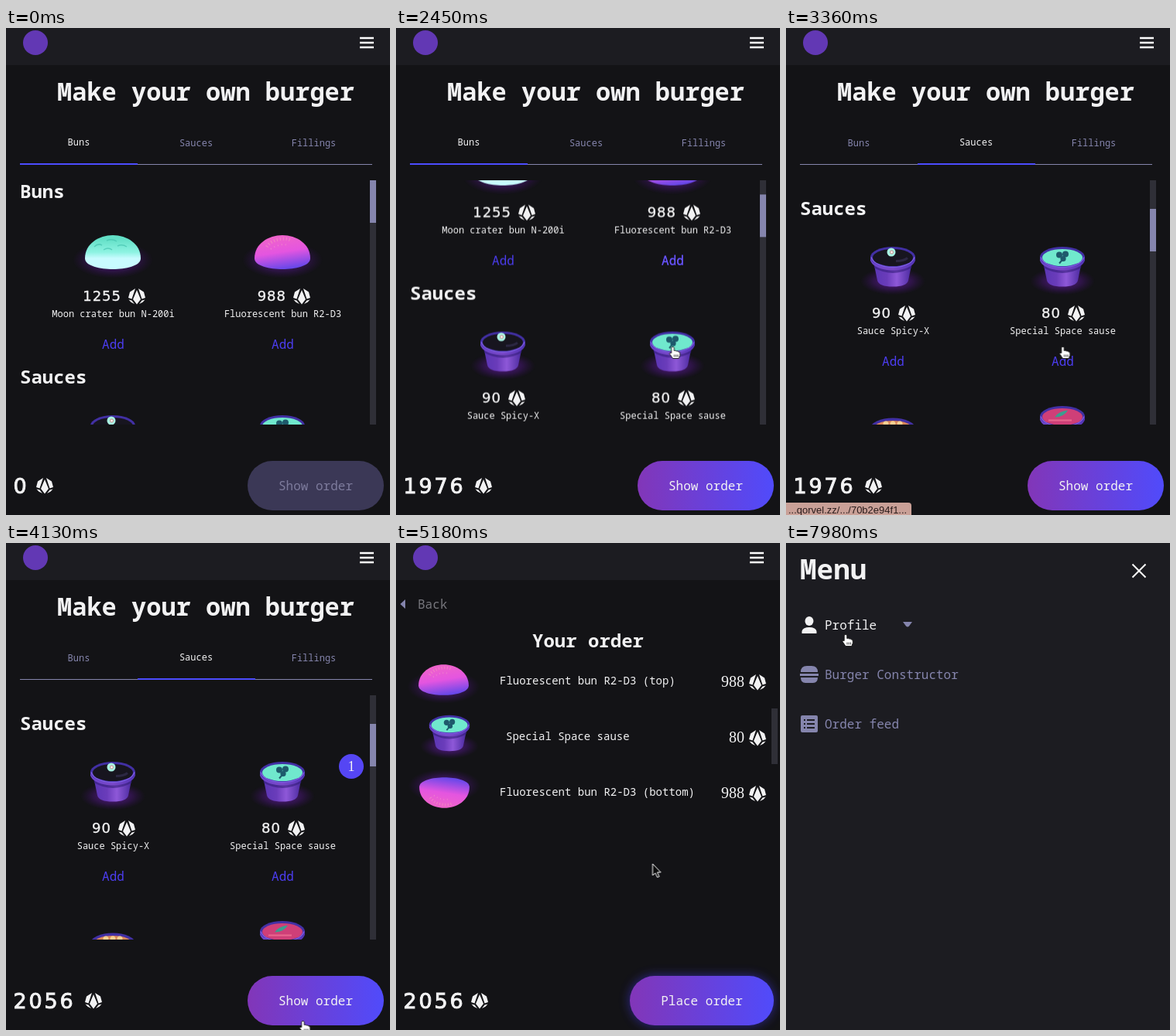
Recreate the animation shown at these times as an HTML page. Size 496 by 630 pixels, loop 8000 ms.

```html
<!DOCTYPE html>
<html lang="en">
<head>
<meta charset="utf-8">
<title>Burger builder</title>
<style>
html, body { margin: 0; width: 100%; height: 100%; overflow: hidden; background: #131316; }
svg { display: block; }
text { font: 12px "Noto Sans Mono", "DejaVu Sans Mono", monospace; fill: #f2f2f3; white-space: pre; }
.h1 { font-size: 32px; font-weight: 600; }
.h2 { font-size: 24px; font-weight: 600; }
.menu-title { font-size: 36px; font-weight: 600; }
.m { font-size: 16px; }
.row { font-size: 14px; }
.mid { text-anchor: middle; }
.dim { fill: #8585ad; }
.add { font-size: 16px; fill: #4c3df0; text-anchor: middle; }
.price { font: 18px "DejaVu Sans", sans-serif; letter-spacing: 1px; text-anchor: end; stroke: #f2f2f3; stroke-width: .35px; }
.total { font: 27px "DejaVu Sans", sans-serif; letter-spacing: 2.8px; stroke: #f2f2f3; stroke-width: 1px; }
.cost { font: 20px "Liberation Serif", serif; text-anchor: end; }
.badge { font: 18px "Liberation Serif", serif; text-anchor: middle; }
.link { font: 13px "Liberation Sans", sans-serif; fill: #2a1c1c; }

/* Hard switches; --k names the window */
.s { animation: var(--k) 8s step-end infinite; }
@keyframes empty   { 0% { opacity: 1 } 24.5%, 100% { opacity: 0 } }
@keyframes filled  { 0% { opacity: 0 } 24.5%, 100% { opacity: 1 } }
@keyframes bunOnly { 0% { opacity: 0 } 24.5% { opacity: 1 } 43.75%, 100% { opacity: 0 } }
@keyframes sauced  { 0% { opacity: 0 } 43.75%, 100% { opacity: 1 } }
@keyframes tabOne  { 0% { opacity: 1 } 31%, 100% { opacity: 0 } }
@keyframes tabTwo  { 0% { opacity: 0 } 31%, 100% { opacity: 1 } }
@keyframes hint    { 0% { opacity: 0 } 32.5% { opacity: 1 } 43.2%, 100% { opacity: 0 } }
@keyframes ordered { 0% { opacity: 0 } 56.625%, 100% { opacity: 1 } }
@keyframes hand {
  0% { opacity: 0 } 16.25% { opacity: 1 } 46.5% { opacity: 0 } 51% { opacity: 1 }
  61% { opacity: 0 } 78.75% { opacity: 1 } 96.25% { opacity: 0 } 98.75%, 100% { opacity: 1 }
}
@keyframes arrow {
  0% { opacity: 0 } 2.625% { opacity: 1 } 16.25% { opacity: 0 } 46.5% { opacity: 1 } 51% { opacity: 0 }
  61% { opacity: 1 } 78.75% { opacity: 0 } 96.25% { opacity: 1 } 98.75%, 100% { opacity: 0 }
}

#list { animation: scroll 8s linear infinite; }
@keyframes scroll {
  0%, 28% { transform: translateY(0) }
  30% { transform: translateY(-85px) }
  31.5% { transform: translateY(-140px) }
  33.25% { transform: translateY(-170px) }
  35% { transform: translateY(-177px) }
  37.5% { transform: translateY(-190px) }
  42%, 100% { transform: translateY(-218px) }
}
#thumb { animation: thumb 8s linear infinite; }
@keyframes thumb {
  0%, 28% { transform: translateY(0) }
  30% { transform: translateY(14.4px) }
  31.5% { transform: translateY(23.8px) }
  33.25% { transform: translateY(28.9px) }
  35% { transform: translateY(30px) }
  37.5% { transform: translateY(32.3px) }
  42%, 100% { transform: translateY(37px) }
}
.glow { animation: glow 8s linear infinite; }
@keyframes glow {
  0%, 51.875% { opacity: 0 }
  55.6%, 61.5% { opacity: .85 }
  64.75% { opacity: .6 }
  68.5%, 100% { opacity: 0 }
}
#menu { animation: slide 8s ease-out infinite; }
@keyframes slide {
  0%, 87.25% { transform: translateX(500px) }
  91%, 100% { transform: translateX(0) }
}
#profile { fill: #8585ad; animation: profile 8s linear infinite; }
#profile text { fill: inherit; }
@keyframes profile { 0%, 98.6% { fill: #8585ad } 99.6%, 100% { fill: #f2f2f3 } }
#cursor { animation: move 8s ease-in-out infinite; }
@keyframes move {
  0%, 2.625% { transform: translate(403px, 600px) }
  17.5%, 45.5% { transform: translate(357.5px, 412px) }
  51.625% { transform: translate(383.5px, 618px) }
  54%, 59.5% { transform: translate(382px, 606px) }
  64.3%, 67.5% { transform: translate(331.5px, 415px) }
  74.4% { transform: translate(452px, 32px) }
  80.5%, 95.5% { transform: translate(464px, 17px) }
  99.6%, 100% { transform: translate(77px, 118px) }
}
</style>
</head>
<body>
<svg width="496" height="630" viewBox="0 0 496 630">
<defs>
  <linearGradient id="moon" x2="0" y2="1">
    <stop offset=".1" stop-color="#62dfc6"/><stop offset=".5" stop-color="#8df3e2"/><stop offset=".68" stop-color="#c8fbff"/>
  </linearGradient>
  <linearGradient id="fluo" x1=".35" x2=".6" y2="1">
    <stop offset=".1" stop-color="#ee62cc"/><stop offset=".5" stop-color="#e455e0"/><stop offset="1" stop-color="#6247ea"/>
  </linearGradient>
  <linearGradient id="pot">
    <stop stop-color="#5a35b4"/><stop offset=".35" stop-color="#6a3cba"/><stop offset=".6" stop-color="#8e58d8"/><stop offset="1" stop-color="#47289c"/>
  </linearGradient>
  <linearGradient id="lip">
    <stop stop-color="#6b45cc"/><stop offset=".5" stop-color="#7a48c8"/><stop offset="1" stop-color="#5434b8"/>
  </linearGradient>
  <linearGradient id="cta"><stop stop-color="#8236b8"/><stop offset="1" stop-color="#504bfb"/></linearGradient>
  <radialGradient id="haze">
    <stop stop-color="#7a1fc0" stop-opacity=".8"/><stop offset=".6" stop-color="#55178c" stop-opacity=".4"/>
    <stop offset="1" stop-color="#40106a" stop-opacity="0"/>
  </radialGradient>
  <filter id="blur" x="-30%" y="-60%" width="160%" height="220%"><feGaussianBlur stdDeviation="7"/></filter>
  <clipPath id="view"><path d="M0 197H470V513H0Z"/></clipPath>

  <path id="facets" d="M-2 -10L-9 -5.500L-11 2L-6.500 3.500ZM-10.500 4.500L-6.500 5.500L-3 10L-7.500 7.800Z"/>
  <g id="gem" fill="#f2f2f3">
    <path d="M0 -8L5 4L0 10.500L-5 4Z"/>
    <use href="#facets"/><use href="#facets" transform="scale(-1 1)"/>
  </g>

  <path id="shell" d="M-36 8C-36 -11 -18 -22 0 -22S36 -11 36 8C36 18 16 22 0 22S-36 18 -36 8Z"/>
  <g id="moonBun">
    <ellipse cy="10" rx="52" ry="24" fill="url(#haze)"/>
    <use href="#shell" fill="url(#moon)"/>
    <path d="M-24 -7q5 -5 10 -2M-8 -15q7 -3 13 1M6 -8q6 -3 12 1M-12 -3q6 -4 11 0" fill="none" stroke="#46c4b0" stroke-width="1.5" opacity=".7"/>
  </g>
  <g id="fluoBun">
    <ellipse cy="10" rx="52" ry="24" fill="url(#haze)"/>
    <use href="#shell" fill="url(#fluo)"/>
    <path d="M-20 -7C-14 -17 4 -20 12 -15" fill="none" stroke="#f5a0bd" stroke-width="4" stroke-dasharray="1 3" opacity=".6"/>
    <path d="M-15 -4Q-4 -12 8 -9" fill="none" stroke="#f59ac8" stroke-width="2" stroke-dasharray="1 4" opacity=".6"/>
  </g>

  <g id="cup">
    <ellipse cy="31" rx="42" ry="18" fill="url(#haze)"/>
    <path d="M-25 6L-20 30Q-18 38 0 38T20 30L25 6Z" fill="url(#pot)"/>
    <path d="M-25 9Q0 24 25 9L24 14Q0 27 -24 14Z" fill="#351d7c" opacity=".6"/>
    <path d="M-29 -1V4C-27 12 -14 17 0 17S27 12 29 4V-1Z" fill="url(#lip)"/>
    <ellipse rx="29" ry="13.500" fill="#4230a4"/>
    <path d="M-28 0C-25 9 -12 13 0 13S25 9 28 0" fill="none" stroke="#7d5ae0" stroke-width="1.500"/>
  </g>
  <g id="spicy">
    <use href="#cup"/><ellipse cy=".5" rx="26" ry="11" fill="#17151f"/>
    <path d="M4 5Q14 5 19 1" fill="none" stroke="#2c2742" stroke-width="3"/>
    <circle cx="-2" cy="-6.500" r="5.500" fill="#a9f2e2"/><circle cx="-1.500" cy="-6.500" r="2" fill="#f7faf5" stroke="#c98787"/>
  </g>
  <g id="space">
    <use href="#cup"/><ellipse cy=".5" rx="26" ry="11" fill="#70e8cd"/>
    <g fill="#1e5a6c"><circle cx="-4" cy="-3" r="4"/><circle cx="4" cy="-4" r="4"/><circle cx="1" cy="2" r="3.600"/></g>
    <path d="M1 2L-4 8" stroke="#1e5a6c" stroke-width="2"/>
  </g>
  <g id="fruit">
    <use href="#cup"/><ellipse cy="1" rx="26" ry="11" fill="#d98558"/>
    <path d="M-17 -1H18M-9 -6H12" stroke="#f5cf92" stroke-width="7" stroke-linecap="round" stroke-dasharray="0 9"/>
  </g>
  <g id="galaxy">
    <use href="#cup"/><ellipse cy=".5" rx="26" ry="11" fill="#cf3f78"/>
    <path d="M-10 1Q-6 -6 7 -8Q2 1 -10 1Z" fill="#3b9d8f"/><path d="M-18 5H12" stroke="#e8688f" stroke-width="2"/>
  </g>
</defs>

<rect width="496" height="630" fill="#131316"/>
<rect width="496" height="48" fill="#1c1c21"/>
<circle cx="38" cy="19" r="16" fill="#6238b4"/>
<path d="M457 14H475M457 19H475M457 24H475" stroke="#fff" stroke-width="2" transform="translate(0 -3.800) scale(1 1.200)"/>

<!-- Builder -->
<text class="h1" x="66" y="94">Make your own burger</text>
<path d="M18 176.500H473" stroke="#8585ad"/>
<g class="s mid" style="--k:tabOne">
  <text x="94" y="152">Buns</text><text class="dim" x="245.500" y="153">Sauces</text>
  <path d="M18 176H170" stroke="#4c4cff" stroke-width="2"/>
</g>
<g class="s mid" style="--k:tabTwo">
  <text class="dim" x="94" y="153">Buns</text><text x="245.500" y="152">Sauces</text>
  <path d="M170 176H322" stroke="#4c4cff" stroke-width="2"/>
</g>
<text class="dim mid" x="397.500" y="153">Fillings</text>

<g clip-path="url(#view)"><g id="list">
  <text class="h2" x="18" y="220">Buns</text>
  <use href="#moonBun" x="138" y="290"/>
  <text class="price" x="149" y="353">1255</text><use href="#gem" x="169" y="347"/>
  <text class="mid" x="138.500" y="374">Moon crater bun N-200i</text>
  <text class="add" x="138.500" y="415">Add</text>
  <use href="#fluoBun" x="357" y="290"/>
  <text class="price" x="362" y="353">988</text><use href="#gem" x="382" y="347"/>
  <text class="mid" x="357.500" y="374">Fluorescent bun R2-D3</text>
  <text class="add" x="357.500" y="415">Add</text>
  <g class="s" style="--k:filled">
    <text class="add" x="357.500" y="415" style="fill:#6d58fa">Add</text>
    <circle cx="446" cy="267" r="16" fill="#5546f4"/><text class="badge" x="446" y="273">2</text>
  </g>

  <text class="h2" x="18" y="460">Sauces</text>
  <use href="#spicy" x="138" y="514.500"/>
  <text class="price" x="136" y="593">90</text><use href="#gem" x="156" y="587"/>
  <text class="mid" x="138.500" y="614">Sauce Spicy-X</text>
  <text class="add" x="138.500" y="655">Add</text>
  <use href="#space" x="357" y="514.500"/>
  <text class="price" x="355" y="593">80</text><use href="#gem" x="375" y="587"/>
  <text class="mid" x="357.500" y="614">Special Space sause</text>
  <text class="add" x="357.500" y="655">Add</text>
  <g class="s" style="--k:sauced">
    <circle cx="446" cy="507" r="16" fill="#5546f4"/><text class="badge" x="446" y="513">1</text>
  </g>
  <use href="#fruit" x="138" y="736"/>
  <use href="#galaxy" x="357" y="720.500"/>
</g></g>
<path d="M470 197H478V513H470Z" fill="#2f2f37"/>
<path id="thumb" d="M470 197H478V252H470Z" fill="#8585ad"/>

<g class="s" style="--k:empty">
  <text class="total" x="9.500" y="602">0</text><use href="#gem" x="50" y="592"/>
  <rect x="312" y="560" width="176" height="64" rx="32" fill="#3b3856"/>
  <text class="m mid" x="400" y="598" style="fill:#7d7b9c">Show order</text>
</g>
<g class="s" style="--k:filled">
  <rect class="glow" x="312" y="560" width="176" height="64" rx="32" fill="#3f35e0" filter="url(#blur)"/>
  <rect x="312" y="560" width="176" height="64" rx="32" fill="url(#cta)"/>
  <text class="m mid" x="400" y="598">Show order</text>
  <use href="#gem" x="113" y="592"/>
</g>
<text class="total s" x="9.500" y="602" style="--k:bunOnly">1976</text>
<text class="total s" x="9.500" y="602" style="--k:sauced">2056</text>
<g class="s" style="--k:hint">
  <path d="M0 614H158Q162 614 162 618V630H0Z" fill="#c9a097"/>
  <text class="link" x="3" y="628">...qorvel.zz/.../70b2e94f1...</text>
</g>

<!-- Order -->
<g class="s" style="--k:ordered">
  <rect y="48" width="496" height="582" fill="#131316"/>
  <path d="M12 73V85L5.500 79Z" fill="#8585ad"/>
  <text class="m" x="28" y="85" style="fill:#77777d">Back</text>
  <text class="h2 mid" x="248" y="135">Your order</text>
  <use href="#fluoBun" transform="translate(61.500 177) scale(.9)"/>
  <text class="row" x="134" y="183">Fluorescent bun R2-D3 (top)</text>
  <text class="cost" x="450" y="186">988</text><use href="#gem" x="467" y="180"/>
  <use href="#space" transform="translate(69 235) scale(.9)"/>
  <text class="row" x="142" y="255">Special Space sause</text>
  <text class="cost" x="450" y="258">80</text><use href="#gem" x="467" y="252"/>
  <use href="#fluoBun" transform="translate(62.500 323) scale(.9 -.9)"/>
  <text class="row" x="134" y="327">Fluorescent bun R2-D3 (bottom)</text>
  <text class="cost" x="450" y="330">988</text><use href="#gem" x="467" y="324"/>
  <path d="M485 214H493V286H485Z" fill="#2f2f37"/>
  <text class="total" x="9.500" y="602">2056</text><use href="#gem" x="108" y="592"/>
  <rect class="glow" x="302" y="560" width="186" height="64" rx="32" fill="#3f35e0" filter="url(#blur)"/>
  <rect x="302" y="560" width="186" height="64" rx="32" fill="url(#cta)"/>
  <text class="m mid" x="395" y="598">Place order</text>
</g>

<!-- Menu -->
<g id="menu">
  <rect width="500" height="630" fill="#1c1c21"/>
  <text class="menu-title" x="18" y="47">Menu</text>
  <path d="M447.500 27.500L464.500 44.500M464.500 27.500L447.500 44.500" stroke="#fff" stroke-width="2"/>
  <g id="profile">
    <ellipse cx="30" cy="101" rx="5.500" ry="6"/>
    <path d="M20.500 117V114Q22 109 30 109T39.500 114V117Z"/>
    <text class="m" x="50" y="112">Profile</text>
  </g>
  <g fill="#8585ad">
    <path d="M151 102H163L159 107.500Q157 109.500 155 107.500Z"/>
    <path d="M19 167Q19 159 27 159H33Q41 159 41 167Z"/>
    <path d="M18 169H42V172H18ZM19 174H41Q41 181 35 181H25Q19 181 19 174Z"/>
    <rect x="19" y="223" width="22" height="22" rx="2"/>
    <path d="M23 229H25M27 229H37M23 234H25M27 234H37M23 239H25M27 239H37" stroke="#1c1c21" stroke-width="2"/>
  </g>
  <text class="m dim" x="50" y="176">Burger Constructor</text>
  <text class="m dim" x="50" y="240">Order feed</text>
</g>

<g id="cursor">
  <path class="s" style="--k:arrow" d="M0 0V15L3.500 12L6 17.500L8.500 16.500L6 11H10.500Z" fill="#0b0b0b" stroke="#fff"/>
  <g class="s" style="--k:hand">
    <path d="M-1.800 1.500Q0 -1 1.800 1.500V5.500Q3.500 4.500 4.500 6Q6.300 5.200 7.200 6.800Q9.300 6.300 9.300 9V11.500L7.800 15.500H0L-4 9.500Q-4 7 -1.800 8.500Z" fill="#fff" stroke="#111" stroke-width=".9"/>
    <path d="M2 10.500V13.500M4.200 10.500V13.500M6.400 10.500V13.500" stroke="#111" stroke-width=".8"/>
  </g>
</g>
</svg>
</body>
</html>
```
